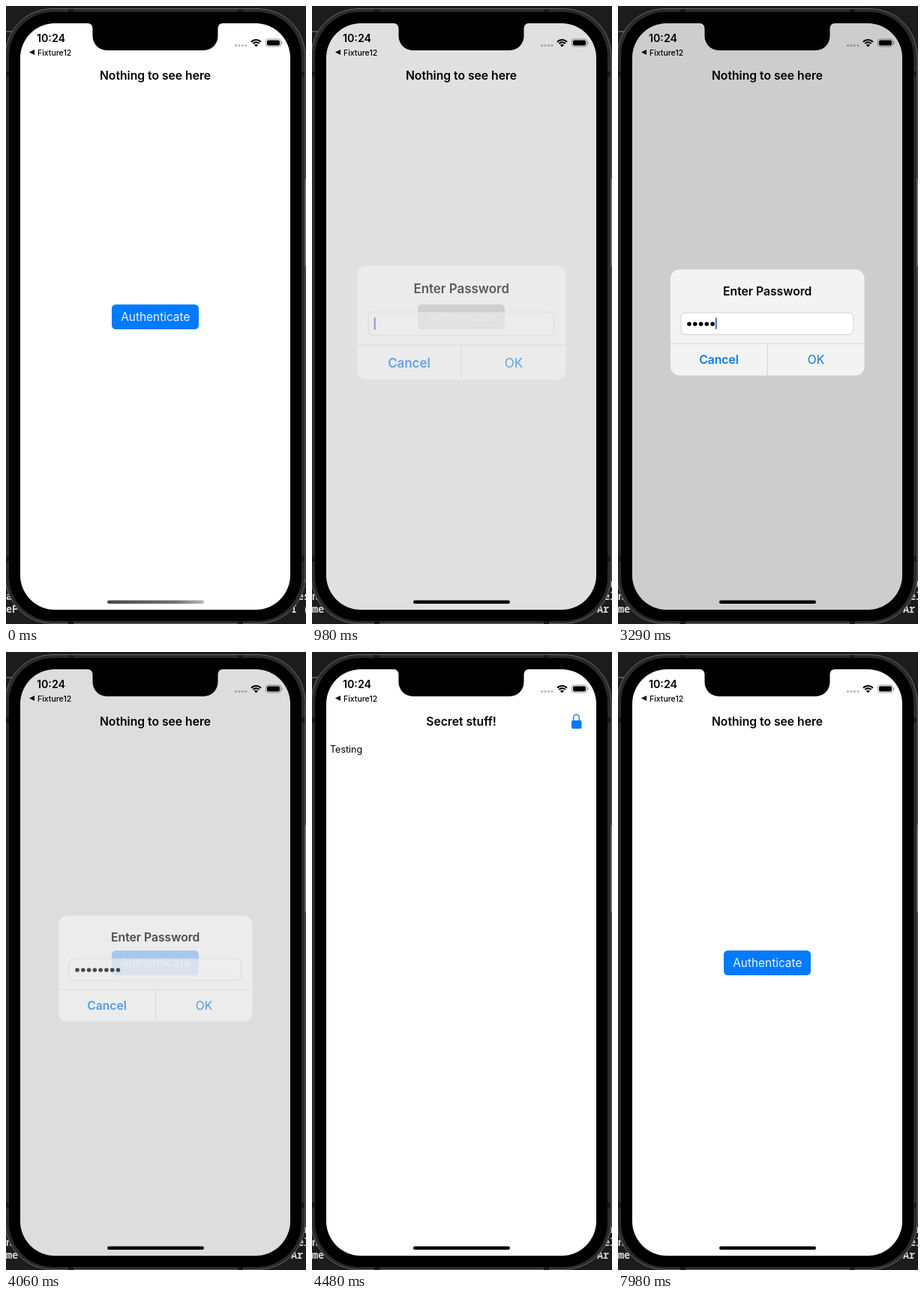
Write an HTML page with a canvas that moves like this. It is 400x822 px and loops after 8000 ms.

```html
<!DOCTYPE html>
<html lang="en">
<head>
<meta charset="utf-8">
<title>Locked notes</title>
<style>
  html, body { margin: 0; width: 100%; height: 100%; overflow: hidden; background: #1c1c1c; }
  canvas { display: block; }
</style>
</head>
<body>
<canvas id="stage" width="400" height="822"></canvas>
<script>
const ctx = document.getElementById('stage').getContext('2d');
const LOOP = 8000, STEP = 70;
const BLUE = '#007aff';
const KEY_TIMES = [2800, 2940, 3010, 3080, 3290, 3360, 3500, 3640];
const BLINKS = [[1400, 1], [1750, -1], [2450, 1]]; // start, +1 fades out, -1 fades in

const clamp = v => Math.max(0, Math.min(1, v));
const between = (t, a, b) => t >= a && t < b;

// Remaining distance of a critically damped spring released at `start`
function springLeft(t, start) {
  const a = Math.max(0, t - start) * 0.0214;
  return (1 + a) * Math.exp(-a);
}

function box(x, y, w, h, r, fill, stroke, line = 1) {
  ctx.beginPath();
  ctx.roundRect(x, y, w, h, r);
  if (fill) { ctx.fillStyle = fill; ctx.fill(); }
  if (stroke) { ctx.strokeStyle = stroke; ctx.lineWidth = line; ctx.stroke(); }
}

function text(str, x, y, size, weight, color, align = 'center', family = 'Inter, sans-serif') {
  ctx.font = `${weight} ${size}px ${family}`;
  ctx.textAlign = align;
  ctx.fillStyle = color;
  ctx.fillText(str, x, y);
}

function dot(x, y, r, color) {
  ctx.beginPath();
  ctx.arc(x, y, r, 0, Math.PI * 2);
  ctx.fillStyle = color;
  ctx.fill();
}

function withAlpha(alpha, draw) {
  ctx.save();
  ctx.globalAlpha *= alpha;
  draw();
  ctx.restore();
}

function drawDesktop(t) {
  ctx.fillStyle = '#1c1c1c';
  ctx.fillRect(0, 0, 400, 822);
  box(0, 33, 8, 2, 0, '#555');
  const left = t < 630 ? ['', 'a', 'eF'] : ['i', 'n', 'me'];
  const right = t < 630 ? ['1', 'es', 'I ('] : ['n', 'el', 'Ar'];
  const mono = '"Noto Sans Mono", monospace';
  left.forEach((s, i) => text(s, 0, 773 + i * 17, 13.5, 700, '#d8d8d8', 'left', mono));
  right.forEach((s, i) => text(s, [398, 389, 380][i], 773 + i * 17, 13.5, 700, '#d8d8d8', 'left', mono));
}

function drawPhone() {
  box(-1, 3.5, 400, 818, 63, '#2a2a2a', '#666');
  for (const x of [83, 309]) for (const y of [4, 818]) box(x, y, 7, 4, 0, '#171717');
  for (const y of [87, 732]) for (const x of [0, 394]) box(x, y, 4, 7, 0, '#171717');
  box(398.5, 230, 1.5, 116, 0, '#777');
  box(4, 8, 390, 810, 59, '#000');
}

function drawNotch() {
  ctx.beginPath();
  ctx.moveTo(109, 22);
  ctx.lineTo(109, 23);
  ctx.quadraticCurveTo(115, 23, 115.5, 30);
  ctx.lineTo(115.5, 40);
  ctx.arcTo(115.5, 59, 135, 59, 19);
  ctx.arcTo(282.5, 59, 282.5, 40, 19);
  ctx.lineTo(282.5, 30);
  ctx.quadraticCurveTo(283, 23, 289, 23);
  ctx.lineTo(289, 22);
  ctx.fillStyle = '#000';
  ctx.fill();
}

function drawStatusBar() {
  text('10:24', 60, 47.5, 14.3, 600, '#000');
  text('Fixture12', 42, 65.5, 10.5, 500, '#000', 'left');
  ctx.beginPath();
  ctx.moveTo(31, 61.5);
  ctx.lineTo(38, 58);
  ctx.lineTo(38, 65);
  ctx.fill();
  for (let i = 0; i < 4; i++) dot(306.5 + i * 4.5, 52.5, 1.6, '#b8b8b8');
  // Wi-Fi fan
  ctx.strokeStyle = '#000';
  ctx.lineWidth = 2.1;
  for (const r of [9, 5.7]) {
    ctx.beginPath();
    ctx.arc(333.5, 54, r, -Math.PI * 0.76, -Math.PI * 0.24);
    ctx.stroke();
  }
  ctx.beginPath();
  ctx.moveTo(333.5, 54.5);
  ctx.arc(333.5, 54.5, 3.6, -Math.PI * 0.76, -Math.PI * 0.24);
  ctx.fillStyle = '#000';
  ctx.fill();
  // Battery
  box(346.5, 44, 20, 10, 3, null, '#999');
  box(348, 45.5, 17, 7, 1.8, '#000');
  box(367.3, 47.3, 1.2, 3.5, 1, '#999');
}

function drawLock() {
  ctx.beginPath();
  ctx.moveTo(348.7, 92);
  ctx.lineTo(348.7, 87);
  ctx.arc(352.5, 87, 3.8, Math.PI, 0);
  ctx.lineTo(356.3, 92);
  ctx.strokeStyle = '#4a7fb8';
  ctx.lineWidth = 1.6;
  ctx.stroke();
  box(346, 91, 13.5, 11, 1.8, BLUE);
}

function drawButton(t, gray) {
  const mix = (from, to) => Math.round(from + (to - from) * gray);
  const pressed = between(t, 770, 910) || between(t, 7910, 7980);
  withAlpha(pressed ? 0.75 : 1, () => {
    box(141, 397, 116, 33, 5.5, `rgb(${mix(0, 172)},${mix(122, 172)},${mix(255, 172)})`);
    text('Authenticate', 199.3, 419.3, 15.4, 400, '#f0f6ff');
  });
}

function drawSecret(t) {
  text('Secret stuff!', 199, 98, 15.7, 600, '#000');
  const note = 'Testing' + '!'.repeat((t >= 6020) + (t >= 6160));
  text(note, 24, 133.7, 12.5, 400, '#000', 'left');
  if (t >= 5530) box(24 + ctx.measureText(note).width + 0.3, 120.5, 2, 17, 1, '#4a82c0');
}

function caretAlpha(t) {
  if (t >= 4060) return 0;
  if (t >= KEY_TIMES[0]) return 1;
  let alpha = 1;
  for (const [start, sign] of BLINKS) {
    if (t >= start) alpha = clamp(sign > 0 ? 1 - (t - start) / 210 : (t - start) / 210);
  }
  return alpha;
}

// Each part fades on its own, so layers stay see-through while moving
function drawAlert(t, shown, scale) {
  ctx.save();
  ctx.translate(199.2, 421);
  ctx.scale(scale, scale);
  ctx.translate(-199.2, -421);
  ctx.globalAlpha = shown;
  box(70, 350.5, 258.5, 141, 12, '#f3f3f3');
  if (between(t, 3920, 4060)) box(200, 450, 128.5, 41.5, [0, 0, 12, 0], '#e2e2e2');
  box(70, 448.5, 258.5, 1, 0, '#d2d2d2');
  box(198.7, 449, 1, 42.5, 0, '#d2d2d2');
  const fill = Math.round(236 + 19 * shown ** 6);
  box(84, 408, 230, 29, 6, `rgb(${fill},${fill},${fill})`, '#d0d0d0');
  text('Enter Password', 199.2, 384.8, 15.7, 600, '#000');
  text('Cancel', 134.5, 476.3, 15.7, 600, '#0f78e4');
  text('OK', 264, 476.3, 15.7, 400, '#0f78e4');
  const typed = KEY_TIMES.filter(k => t >= k).length;
  for (let i = 0; i < typed; i++) dot(95 + i * 7.78, 423, 2.8, '#000');
  withAlpha(caretAlpha(t), () => box(91 + typed * 7.78, 414.5, 1.9, 15.5, 1, '#3f66d8'));
  ctx.restore();
}

function drawHomeBar(t) {
  let fill = '#000';
  if (t < 630) {
    fill = ctx.createLinearGradient(135, 0, 264, 0);
    fill.addColorStop(0, '#484848');
    fill.addColorStop(0.7, '#707070');
    fill.addColorStop(1, '#b8b8b8');
  }
  box(135, 790.5, 129, 4.6, 2.3, fill);
}

function draw(t) {
  drawDesktop(t);
  drawPhone();

  const closing = t >= 4060;
  const entering = 1 - springLeft(t, 883);
  const shown = t >= 4480 ? 0 : closing ? springLeft(t, 4007) : entering;
  const secret = between(t, 4480, 6790);

  ctx.save();
  box(19, 23, 360, 780, 46, '#fff');
  ctx.clip();
  if (secret) {
    drawSecret(t);
  } else {
    text('Nothing to see here', 199, 98, 15.7, 600, '#000');
    drawButton(t, closing ? 0 : clamp(shown * 1.7));
  }
  if (between(t, 4480, 6930)) {
    withAlpha(t < 6720 ? 1 : 0.4 * (1 - (t - 6720) / 210), drawLock);
  }
  drawStatusBar();
  if (shown > 0.002) {
    ctx.fillStyle = `rgba(0,0,0,${0.196 * shown})`;
    ctx.fillRect(19, 23, 360, 780);
    drawAlert(t, shown, closing ? 1 : 1.2 - 0.2 * entering);
  }
  drawHomeBar(t);
  ctx.restore();
  drawNotch();
}

function tick() {
  const t = performance.now() % LOOP;
  draw(Math.floor(t / STEP) * STEP);
  requestAnimationFrame(tick);
}
tick();
</script>
</body>
</html>
```
